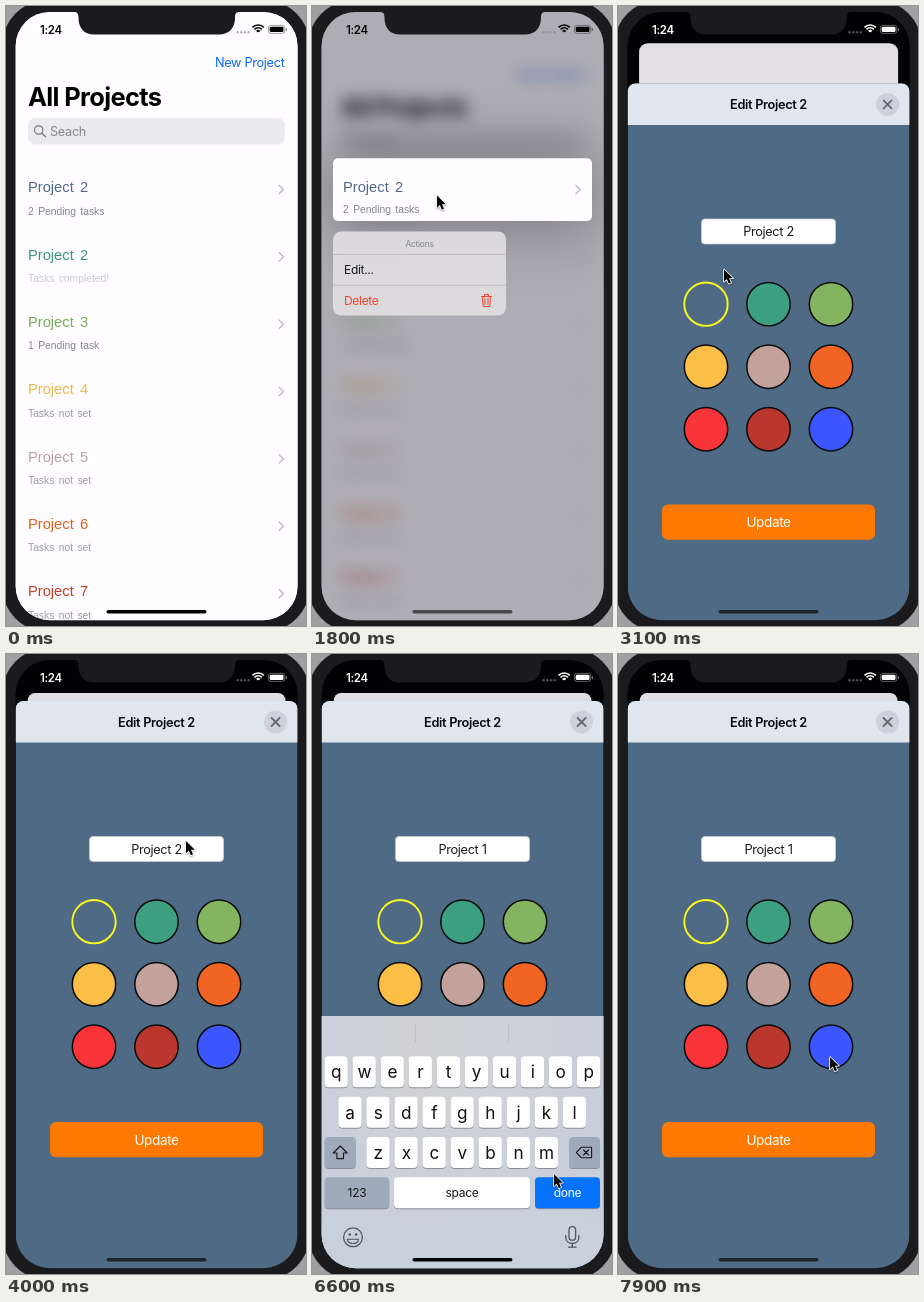
An HTML page with a canvas for the animation above (8000 ms loop, 300 by 620 pixels).

```html
<!DOCTYPE html>
<html lang="en">
<head>
<meta charset="utf-8">
<title>Project list</title>
<style>
html, body { margin: 0; width: 100%; height: 100%; overflow: hidden; background: #a0a0a2; }
canvas { display: block; width: 300px; height: 620px; }
</style>
</head>
<body>
<canvas id="stage"></canvas>
<script>
const W = 300, H = 620, LOOP = 8000;
const dpr = Math.max(1, window.devicePixelRatio || 1);
const UI = 'Inter, "Open Sans", sans-serif';
const ROW = '"Liberation Sans", Arial, sans-serif';
const BEZEL = '#1b1a1c', STEEL = '#4e6a85';

function sized(canvas) {
  canvas.width = W * dpr;
  canvas.height = H * dpr;
  return canvas.getContext('2d');
}
const main = sized(document.getElementById('stage'));
const listCanvas = document.createElement('canvas');
const list = sized(listCanvas);
let c = main;

const clamp = v => Math.min(1, Math.max(0, v));
const mix = (a, b, k) => a + (b - a) * k;
const span = (t, a, b) => clamp((t - a) / (b - a));
const outCubic = k => 1 - (1 - k) ** 3;
const inOut = k => k * k * (3 - 2 * k);

function box(x, y, w, h, r, fill, stroke, lw = 1) {
  c.beginPath();
  c.roundRect(x, y, w, h, r);
  if (fill) { c.fillStyle = fill; c.fill(); }
  if (stroke) { c.strokeStyle = stroke; c.lineWidth = lw; c.stroke(); }
}
function disc(x, y, r, fill, stroke, lw = 1) {
  c.beginPath();
  c.arc(x, y, r, 0, Math.PI * 2);
  if (fill) { c.fillStyle = fill; c.fill(); }
  if (stroke) { c.strokeStyle = stroke; c.lineWidth = lw; c.stroke(); }
}
function path(d, color, lw = 1, fill) {
  const p = new Path2D(d);
  c.lineCap = c.lineJoin = 'round';
  if (fill) { c.fillStyle = fill; c.fill(p); }
  if (color) { c.strokeStyle = color; c.lineWidth = lw; c.stroke(p); }
}
// y is the middle of the capital letters
function text(s, x, y, size, color, { weight = 400, align = 'left', font = UI } = {}) {
  c.font = `${weight} ${size}px ${font}`;
  c.letterSpacing = (font === UI ? -0.026 * size : 0) + 'px';
  c.wordSpacing = (font === ROW ? 0.15 * size : 0) + 'px';
  c.textAlign = align;
  c.textBaseline = 'alphabetic';
  c.fillStyle = color;
  c.fillText(s, x, y + size * 0.36);
}
function chevron(x, y) {
  path(`M${x - 2.2} ${y - 4.2}l4.4 4.2l-4.4 4.2`, '#bcbcc1', 1.4);
}

const rows = [
  ['2', '#51698a', '2 Pending tasks', '#85858a'],
  ['2', '#3a967c', 'Tasks completed!', '#cbcbd0'],
  ['3', '#78ad58', '1 Pending task', '#85858a'],
  ['4', '#ebb94a', 'Tasks not set', '#9d9da2'],
  ['5', '#b9a19b', 'Tasks not set', '#9d9da2'],
  ['6', '#e0601c', 'Tasks not set', '#9d9da2'],
  ['7', '#cb3b29', 'Tasks not set', '#9d9da2']
];

function rowText([n, color, note, noteColor], x, y, gap) {
  text('Project ' + n, x, y, 14.7, color, { font: ROW });
  text(note, x, y + gap, 10.3, noteColor, { font: ROW });
}

function drawList(scale, top, radius) {
  c = list;
  c.setTransform(dpr, 0, 0, dpr, 0, 0);
  c.clearRect(0, 0, W, H);
  c.translate(150.5, top);
  c.scale(scale, scale);
  c.translate(-150.5, -6);
  box(9.6, 6, 282, 608.2, radius, '#fffdff');
  text('New Project', 278.5, 56, 12.75, '#0a6cf0', { align: 'right' });
  text('All Projects', 22, 90.5, 25.5, '#000', { weight: 700 });
  box(22, 112, 257, 26.5, 7.5, '#ebeaed');
  disc(32.7, 124, 4.2, null, '#77777c', 1.2);
  path('M35.9 127.2l3.6 3.6', '#77777c', 1.3);
  text('Seach', 44, 125.2, 12.75, '#88888d');
  rows.forEach((row, i) => {
    const y = 181 + i * 67.35;
    rowText(row, 22, y, 24);
    chevron(275.3, y + 2.5);
  });
  c = main;
}

function drawRowCard(m, closing) {
  const x = closing ? 21 - 1.3 * (1 - m) : mix(12, 21, m);
  const y = closing ? 152.3 + 6.7 * (1 - m) : 152.3;
  c.save();
  c.globalAlpha = clamp(m * 4);
  c.shadowColor = `rgba(0,0,0,${0.36 * clamp(m * 1.3)})`;
  c.shadowBlur = 64 * dpr;
  c.shadowOffsetY = 2 * dpr;
  box(x, y, 301 - 2 * x, 62.7, mix(2, 5, m), '#fffdff');
  c.shadowColor = 'transparent';
  rowText(rows[0], x + 10, y + 28.5, 22.5);
  chevron(287 - x, y + 31.3);
  c.restore();
}

function drawMenu(m, picked) {
  const s = 0.63 + 0.37 * m;
  c.save();
  c.globalAlpha = clamp(m * 2.7);
  c.translate(21 - 1.3 * (1 - m), 225.5 + 1.7 * (1 - m));
  c.scale(s, s);
  box(0, 0, 173, 84, 8, 'rgba(225,222,225,.94)');
  if (picked) { c.fillStyle = 'rgba(120,120,126,.24)'; c.fillRect(0, 23, 173, 31); }
  c.fillStyle = 'rgba(110,110,115,.3)';
  c.fillRect(0, 22.5, 173, 0.8);
  c.fillRect(0, 53.3, 173, 0.8);
  text('Actions', 86.5, 12, 8.4, '#858589', { align: 'center' });
  text('Edit...', 11, 38.5, 12, '#1d1d1f');
  text('Delete', 11, 69.3, 12, '#f2402a');
  c.translate(153.5, 69);
  path('M-5 -4H5M-2 -4V-6H2V-4M-4 -4L-3.3 6H3.3L4 -4M-1.5 -1.8V4M1.5 -1.8V4', '#f2402a', 1);
  c.restore();
}

function drawStatus(color) {
  text('1:24', 34, 23.5, 11.4, color, { weight: 600 });
  for (let i = 0; i < 4; i++) disc(231.6 + i * 3.7, 26.3, 1.2, 'rgba(130,130,135,.6)');
  c.lineCap = 'butt';
  [[2, 2.2], [5.2, 1.6], [8, 1.6]].forEach(([r, lw]) => {
    c.beginPath();
    c.arc(252.2, 27, r, -Math.PI * 0.75, -Math.PI * 0.25);
    c.strokeStyle = color;
    c.lineWidth = lw;
    c.stroke();
  });
  c.globalAlpha = 0.45;
  box(262.4, 19.4, 16.4, 8, 2.4, null, color, 0.8);
  box(279.8, 22, 1.2, 3, 0.6, color);
  c.globalAlpha = 1;
  box(263.7, 20.7, 13.8, 5.4, 1.4, color);
}

const swatches = [STEEL, '#3c9f80', '#83b45f', '#fbbe47', '#c3a29b', '#f26424', '#f93439', '#b9372d', '#3b56ff'];

function drawSheet(top, name) {
  c.save();
  c.translate(0, top - 47);
  box(9.6, 47, 282, 580, [8, 8, 0, 0], STEEL);
  box(9.6, 47, 282, 41.5, [8, 8, 0, 0], '#dfe6ed');
  text('Edit Project 2', 150.5, 68, 12.75, '#0a0a0c', { weight: 600, align: 'center' });
  disc(269.6, 68, 11.5, '#cfd0dd');
  path('M265.6 64l8 8m0 -8l-8 8', '#68686f', 1.8);
  box(83.5, 182.5, 134, 25, 3.5, '#fff', '#c9ced4', 0.7);
  text(name, 150.5, 195, 12.75, '#1c1c1e', { align: 'center' });
  swatches.forEach((color, i) => {
    const x = 88 + (i % 3) * 62.5, y = 267.7 + Math.floor(i / 3) * 62.5;
    disc(x, y, 21.7, color, i ? '#0a0a0a' : '#fbfb1c', i ? 1.5 : 1.9);
  });
  box(44, 468, 213, 35.3, 6, '#ff7900');
  text('Update', 150.5, 486, 13.5, '#fff', { align: 'center' });
  c.restore();
}

function key(x, y, w, label, size, fill, color) {
  box(x, y + 1, w, 31, 4, '#8b9099');
  box(x, y, w, 31, 4, fill);
  if (label) text(label, x + w / 2, y + 15.6, size, color, { align: 'center' });
}
function letters(s, x, y) {
  [...s].forEach((ch, i) => key(x + i * 28.05, y, 23.3, ch, 17.2, '#fefefe', '#111'));
}

function drawKeyboard(drop, pressed) {
  c.save();
  c.translate(0, drop);
  const g = c.createLinearGradient(10, 0, 291, 0);
  g.addColorStop(0, '#c8d0dc');
  g.addColorStop(0.3, '#d1d1d3');
  g.addColorStop(0.6, '#cfd2d8');
  g.addColorStop(1, '#c6cedb');
  c.fillStyle = g;
  c.fillRect(9, 362, 283, 260);
  const low = c.createLinearGradient(0, 440, 0, 580);
  low.addColorStop(0, 'rgba(200,208,220,0)');
  low.addColorStop(1, '#c8d0dc');
  c.fillStyle = low;
  c.fillRect(9, 440, 283, 180);
  c.fillStyle = '#b6bac2';
  c.fillRect(103, 370, 0.8, 18);
  c.fillRect(196.3, 370, 0.8, 18);

  const dim = '#9fabba';
  letters('qwertyuiop', 12.5, 402.3);
  letters('asdfghjkl', 26.3, 442.8);
  letters('zxcvbnm', 54.4, 483);
  key(12.7, 483, 31, '', 0, dim);
  key(257, 483, 31, '', 0, dim);
  path('M28.2 492l-7 7h3.7v5.6h6.6v-5.6h3.7z', '#17181a', 1.1);
  path('M264.4 498.5l5 -5.3h10.2v10.6h-10.2zM271.5 496l5 5m0 -5l-5 5', '#17181a', 1.1);
  key(12.7, 523.3, 64.5, '123', 12, dim, '#17181a');
  key(82, 523.3, 136, 'space', 12, '#fefefe', '#17181a');
  key(223, 523.3, 65, 'done', 12, pressed ? '#fefefe' : '#0673ff', pressed ? '#17181a' : '#fff');

  const ink = '#50555d';
  disc(41, 583.3, 9.4, null, ink, 1.3);
  disc(37.8, 580.5, 1.3, ink);
  disc(44.2, 580.5, 1.3, ink);
  path('M35.5 585.3h11c-.8 5.6 -10.2 5.6 -11 0z', ink, 1.1);
  box(257, 572.6, 6.6, 13.6, 3.3, null, ink, 1.3);
  path('M253.8 581.5v2.2c0 7.6 13 7.6 13 0v-2.2M260.3 589.6v3.4M256.5 593.2h7.6', ink, 1.3);
  c.restore();
}

const track = [
  [300, 215, 330], [900, 125, 189.5], [2000, 125, 189.5], [2500, 106, 263.5],
  [3200, 106, 263.5], [3800, 180, 187], [5750, 180, 187], [6250, 242, 520],
  [7250, 242, 520], [7750, 212, 403]
];
function drawPointer(t) {
  if (t < track[0][0]) return;
  const i = track.findLastIndex(k => k[0] <= t);
  const a = track[i], b = track[i + 1] || a;
  const k = a === b ? 0 : inOut(span(t, a[0], b[0]));
  c.save();
  c.translate(mix(a[1], b[1], k), mix(a[2], b[2], k));
  c.shadowColor = 'rgba(0,0,0,.35)';
  c.shadowBlur = 2 * dpr;
  c.shadowOffsetY = dpr;
  const arrow = 'M0 0V12.2L2.8 9.6L4.8 14.2L7 13.2L5 8.8H8.8Z';
  path(arrow, '#fff', 1.6);
  c.shadowColor = 'transparent';
  path(arrow, null, 0, '#050505');
  c.restore();
}

function drawNotch() {
  path('M68 4H233V6C230 6 229 8 229 12C229 22 223 28.5 213 28.5H88C78 28.5 72.5 22 72.5 12C72.5 8 71.5 6 68 6Z', null, 0, BEZEL);
}

function render(t) {
  const closing = t >= 2713;
  const m = closing ? 1 - outCubic(span(t, 2713, 2950)) : outCubic(span(t, 1200, 1600));
  const w = Math.max(0, t - 2713) * 0.012;
  const rise = 1 - (1 + w) * Math.exp(-w);
  const scale = 1 - 0.05 * m - 0.086 * rise;
  const top = 310 - 304 * scale + 6.9 * rise;

  c.setTransform(dpr, 0, 0, dpr, 0, 0);
  c.fillStyle = '#a0a0a2';
  c.fillRect(0, 0, W, H);
  box(-4, -6, 308, 632, 46, BEZEL);

  c.save();
  c.beginPath();
  c.roundRect(9.6, 6, 282, 608.2, 34);
  c.clip();
  const back = Math.round(255 * (1 - clamp(rise * 5)));
  c.fillStyle = `rgb(${back},${back},${back})`;
  c.fillRect(9, 5, 283, 610);
  drawList(scale, top, mix(34, 8, rise));
  if (m > 0.01) c.filter = `blur(${8 * m * dpr}px)`;
  c.drawImage(listCanvas, 0, 0, W, H);
  c.filter = 'none';
  const shade = 0.34 * m + 0.13 * rise * (1 - m);
  c.fillStyle = `rgba(20,16,34,${shade})`;
  c.fillRect(9, 5, 283, 610);
  if (m > 0.01) {
    drawRowCard(m, closing);
    drawMenu(m, t >= 2500);
  }

  const name = 'Project ' + (t < 5600 ? '2' : t < 5850 ? '' : '1');
  if (rise > 0) drawSheet(mix(614, 47, rise), name);
  const up = inOut(span(t, 4350, 4750)) * (1 - inOut(span(t, 7250, 7600)));
  if (up > 0) drawKeyboard(252 * (1 - up), t >= 7000 && t < 7200);

  drawStatus(rise > 0.7 ? '#fff' : '#050505');
  const bar = up > 0.5 || t < 1200 ? '#000' : rise > 0.5 ? '#202328' : '#48484b';
  box(100.5, 604, 100, 3.6, 1.8, bar);
  c.restore();

  drawNotch();
  drawPointer(t);
}

const start = performance.now();
function tick() {
  render((performance.now() - start) % LOOP);
  requestAnimationFrame(tick);
}
tick();
</script>
</body>
</html>
```
